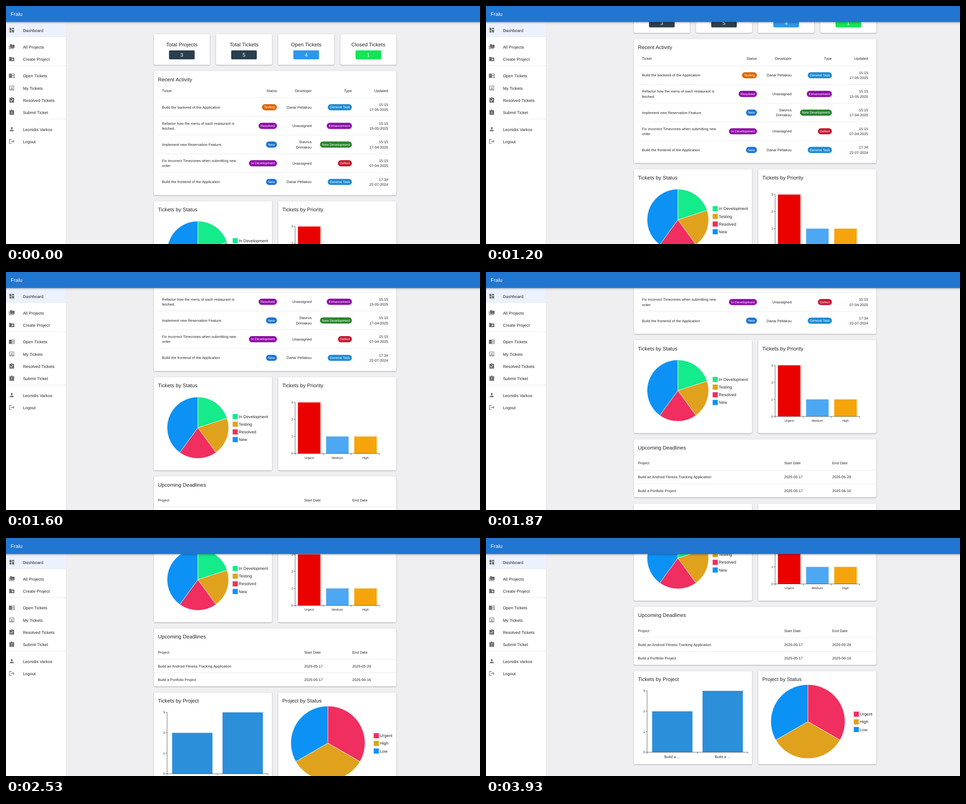
These frames come from a looping animation (1055x531 px, 4 s). An HTML page:

```html
<!DOCTYPE html>
<html lang="en">
<head>
<meta charset="utf-8">
<title>Ticket dashboard</title>
<style>
  html, body { margin: 0; width: 100%; height: 100%; overflow: hidden; background: #efeef0; }
  svg { display: block; width: 100vw; height: 100vh; }
  text {
    font-family: "Liberation Sans", Arial, sans-serif;
    letter-spacing: .15px; fill: #212121; text-rendering: geometricPrecision;
  }
  .card { fill: #fff; filter: drop-shadow(0 2px 2px rgba(0,0,0,.26)) drop-shadow(0 0 2px rgba(0,0,0,.1)); }
  .bar { fill: #2076d1; filter: drop-shadow(0 2px 4px rgba(0,0,0,.35)); }
  .rule { stroke: #e0e0e0; stroke-width: 1.2; }
  .axis { stroke: #212121; stroke-width: 1.2; fill: none; }
  .slice { stroke: #fff; stroke-width: 1.4; stroke-linejoin: round; }
  .icon { fill: #6c6c6c; fill-rule: evenodd; }
</style>
</head>
<body>
<svg viewBox="0 0 1848 930.14" preserveAspectRatio="xMinYMin slice">
  <g id="page"></g>
  <g id="side"></g>
  <g id="top"></g>
</svg>
<script>
const SCALE = 1055 / 1848;
const LOOP = 4000;
const page = document.getElementById('page');
const side = document.getElementById('side');
const topBar = document.getElementById('top');

function add(parent, tag, attrs) {
  const el = document.createElementNS('http://www.w3.org/2000/svg', tag);
  for (const key in attrs) el.setAttribute(key, attrs[key]);
  return parent.appendChild(el);
}

// y is the middle of the capitals
function label(parent, x, y, str, size = 14, anchor = 'start', fill) {
  const el = add(parent, 'text', { x, y: y + size * .355, 'font-size': size, 'text-anchor': anchor });
  if (fill) el.style.fill = fill;
  el.textContent = str;
  return el;
}

function lines(x, y, rows, anchor) {
  rows.forEach((row, i) => label(page, x, y + (i - (rows.length - 1) / 2) * 20, row, 14, anchor));
}

const box = (parent, x, y, width, height, fill, rx = 0) =>
  add(parent, 'rect', { x, y, width, height, fill, rx });

const rule = (parent, x1, x2, y) =>
  add(parent, 'line', { class: 'rule', x1, x2, y1: y, y2: y });

function card(x, y, width, height, title, titleY) {
  add(page, 'rect', { class: 'card', x, y, width, height, rx: 4 });
  if (title) label(page, x + 16, titleY, title, 20);
}

function chip(right, y, str, fill) {
  const rect = box(page, 0, y - 12, 0, 24, fill, 12);
  const text = label(page, right - 8, y, str, 13, 'end', '#fff');
  const width = text.getComputedTextLength() + 16;
  rect.setAttribute('x', right - width);
  rect.setAttribute('width', width);
}

function pie(cx, cy, r, parts) {
  const total = parts.reduce((sum, p) => sum + p[1], 0);
  const point = a => `${cx + r * Math.sin(a)} ${cy - r * Math.cos(a)}`;
  let angle = 0;
  for (const [, share, fill] of parts) {
    const end = angle + share / total * 2 * Math.PI;
    add(page, 'path', { class: 'slice', fill, d: `M${cx} ${cy}L${point(angle)}A${r} ${r} 0 0 1 ${point(end)}Z` });
    angle = end;
  }
}

function legend(x, y, parts) {
  parts.forEach(([name, , fill], i) => {
    box(page, x, y + i * 30 - 10, 20, 20, fill);
    label(page, x + 23.8, y + i * 30, name, 16);
  });
}

function barChart(x0, x1, y0, unit, labelSize, bars) {
  const band = (x1 - x0) / bars.length;
  bars.forEach(([name, value, fill], i) => {
    const x = x0 + i * band;
    box(page, x + band * .1, y0 - value * unit, band * .8, value * unit, fill);
    label(page, x + band / 2, y0 + 10 + labelSize / 2, name, labelSize, 'middle');
  });
  let d = `M${x0} ${y0 - 3 * unit}V${y0}H${x1}`;
  for (let i = 0; i <= bars.length; i++) d += `M${x0 + i * band} ${y0}v6`;
  for (let v = 0; v <= 3; v++) {
    d += `M${x0} ${y0 - v * unit}h-6`;
    label(page, x0 - 8, y0 - v * unit, v, 12, 'end');
  }
  add(page, 'path', { class: 'axis', d });
}

// Layout of the scrolling page
const LEFT = 576.3, RIGHT = 1521.9, HALF = 460.8, COL2 = 1061.1;
const RED = '#f02e5f', GOLD = '#e0a21d', BLUE = '#0c92f5', MINT = '#14eb8a';
const PURPLE = '#900aa9', SKY = '#1e8bd3', ROYAL = '#1c75d1', SLATE = '#2a3f4d';

[['Total Projects', 3, SLATE], ['Total Tickets', 5, SLATE],
 ['Open Tickets', 4, '#2d97ed'], ['Closed Tickets', 1, '#12e655']].forEach(([name, count, fill], i) => {
  const x = LEFT + i * 242.4, mid = x + 109.2;
  card(x, 110.4, 218.4, 119.6);
  label(page, mid, 150, name, 20, 'middle');
  box(page, mid - 50, 173.4, 100, 35, fill, 4);
  label(page, mid, 191, count, 20, 'middle', '#fff');
});

card(LEFT, 254, RIGHT - LEFT, 485, 'Recent Activity', 286.5);
const COLS = { ticket: 608.3, status: 1056.3, dev: 1191.5, type: 1348.5, updated: 1490 };
label(page, COLS.ticket, 330.8, 'Ticket');
label(page, COLS.status, 330.8, 'Status', 14, 'end');
label(page, COLS.dev, 330.8, 'Developer', 14, 'end');
label(page, COLS.type, 330.8, 'Type', 14, 'end');
label(page, COLS.updated, 330.8, 'Updated', 14, 'end');

[
  ['Build the backend of the Application', 'Testing', '#e36305', 'Danai Peltakou', 'General Task', SKY, '15:15|17-05-2025'],
  ['Refactor how the menu of each restaurant is|fetched.', 'Resolved', PURPLE, 'Unassigned', 'Enhancement', PURPLE, '15:15|15-05-2025'],
  ['Implement new Reservation Feature.', 'New', ROYAL, 'Stavros|Drimakou', 'New Development', '#2c8530', '15:15|17-04-2025'],
  ['Fix incorrect Timezones when submitting new|order', 'In Development', PURPLE, 'Unassigned', 'Defect', '#c81430', '15:15|07-04-2025'],
  ['Build the frontend of the Application', 'New', ROYAL, 'Danai Peltakou', 'General Task', SKY, '17:34|22-07-2024']
].forEach(([ticket, status, statusFill, dev, type, typeFill, updated], i) => {
  const top = 358.8 + i * 73, mid = top + 36.7;
  rule(page, LEFT + 16, RIGHT - 16, top);
  lines(COLS.ticket, mid, ticket.split('|'), 'start');
  chip(COLS.status, mid, status, statusFill);
  lines(COLS.dev, mid, dev.split('|'), 'end');
  chip(COLS.type, mid, type, typeFill);
  lines(COLS.updated, mid, updated.split('|'), 'end');
});

const statuses = [['In Development', 1, MINT], ['Testing', 1, GOLD], ['Resolved', 1, RED], ['New', 2, BLUE]];
card(LEFT, 763, HALF, 364, 'Tickets by Status', 796);
pie(748, 960.6, 120, statuses);
legend(883.7, 917, statuses);

card(COL2, 763, HALF, 364, 'Tickets by Priority', 796);
barChart(1127.2, 1456.5, 1061.5, 66.6, 12,
  [['Urgent', 3, '#eb0000'], ['Medium', 1, '#4ca8f2'], ['High', 1, '#f5a50b']]);

card(LEFT, 1151, RIGHT - LEFT, 226.5, 'Upcoming Deadlines', 1184);
[['Project', 'Start Date', 'End Date', 1244.3],
 ['Build an Android Fitness Tracking Application', '2025-05-17', '2025-05-28', 1298.6],
 ['Build a Portfolio Project', '2025-05-17', '2025-06-16', 1351.6]].forEach(([name, start, end, y], i) => {
  label(page, LEFT + 16, y, name);
  label(page, 1162.5, y, start);
  label(page, 1350, y, end);
  if (i) rule(page, LEFT, RIGHT, y - 26.9);
});

card(LEFT, 1402, HALF, 364, 'Tickets by Project', 1434);
barChart(628, 1021.2, 1719.3, 80, 14.5, [['Build a ...', 2, '#2b8fda'], ['Build a ...', 3, '#2b8fda']]);

const levels = [['Urgent', 1, RED], ['High', 1, GOLD], ['Low', 1, BLUE]];
card(COL2, 1402, HALF, 364, 'Project by Status', 1434);
pie(1255, 1599.3, 144.5, levels);
legend(1433.7, 1570.4, levels);

// Sidebar
const clipboard = 'M3 3h6a3 3 0 0 1 6 0h6v18H3zM11 4a1 1 0 1 0 2 0a1 1 0 1 0-2 0z';
const icons = {
  dash: 'M3 3h8v10H3zM3 15h8v6H3zM13 3h8v6h-8zM13 11h8v10h-8z',
  folders: 'M3 6H1v15h19v-2H3zM5 2h7l2 2h9v13H5z',
  create: 'M2 4h8l2 2h10v14H2zM14 9v3h-3v2h3v3h2v-3h3v-2h-3V9z',
  reader: 'M1 4h22v17H1zM12 6v13h9V6zM13 9.5h7V11h-7zm0 2.5h7v1.5h-7zm0 2.5h7V16h-7z',
  portrait: 'M3 3h18v18H3zM5 5v14h14V5zM9.8 10a2.2 2.2 0 1 0 4.4 0a2.2 2.2 0 1 0-4.4 0M7.5 17v-.7c0-3 9-3 9 0V17z',
  done: clipboard + 'M10 17l-4-4 1.4-1.4 2.6 2.6 6.6-6.6L18 9z',
  late: clipboard + 'M11 8h2v6h-2zm0 8h2v2h-2z',
  person: 'M8 8a4 4 0 1 0 8 0a4 4 0 1 0-8 0M4 20v-2c0-5.3 16-5.3 16 0v2z',
  exit: 'M17 7l-1.4 1.4 2.6 2.6H8v2h10.2l-2.6 2.6L17 17l5-5zM12 3H2v18h10v-2H4V5h8z'
};
const menu = [
  [['dash', 'Dashboard']],
  [['folders', 'All Projects'], ['create', 'Create Project']],
  [['reader', 'Open Tickets'], ['portrait', 'My Tickets'], ['done', 'Resolved Tickets'], ['late', 'Submit Ticket']],
  [['person', 'Leonidis Varkos'], ['exit', 'Logout']]
];
box(side, 0, 0, 234, 931, '#fff');
box(side, 234, 0, 1, 931, '#dedee0');
box(side, 0, 63, 234, 56.5, '#ecf2fd');
let rowY = 95.3;
menu.forEach((group, i) => {
  if (i) {
    rule(side, 0, 234, rowY - 16 - 24.5);
  }
  for (const [icon, name] of group) {
    add(side, 'path', { class: 'icon', d: icons[icon], transform: `translate(10.5 ${rowY - 13})` });
    label(side, 66, rowY, name, 16);
    rowY += 48;
  }
  rowY += 17;
});

// App bar
add(topBar, 'rect', { class: 'bar', x: -10, y: -10, width: 1868, height: 72.6 });
label(topBar, 18, 31, 'Fralu', 20, 'start', '#fff');

// Scroll position in stage pixels: [ms, px]
const stops = [[870, 0], [930, 2.3], [1200, 71.3], [1600, 201], [2130, 358], [2530, 455.5], [2800, 503.5]];
const speed = i => (stops[i + 1][1] - stops[i][1]) / (stops[i + 1][0] - stops[i][0]);
const slopes = stops.map((_, i) => {
  if (i === 0 || i === stops.length - 1) return 0;
  const a = speed(i - 1), b = speed(i);
  return 2 * a * b / (a + b);
});

function scrollAt(t) {
  const last = stops.length - 1;
  if (t <= stops[0][0]) return 0;
  if (t >= stops[last][0]) return stops[last][1];
  const i = stops.findIndex(s => s[0] > t) - 1;
  const [t0, p0] = stops[i], [t1, p1] = stops[i + 1];
  const h = t1 - t0, u = (t - t0) / h, v = 1 - u;
  return p0 * (1 + 2 * u) * v * v + p1 * (3 - 2 * u) * u * u
    + h * (slopes[i] * u * v * v - slopes[i + 1] * u * u * v);
}

// The picture advances 15 times a second, on a 10 ms grid
function tick(ms) {
  const step = Math.floor((Math.floor(ms / 10) * 10 + 3.4) * 15 / 1000);
  return Math.round(step * 100 / 15) * 10;
}

const begin = performance.now();
function draw() {
  const t = (performance.now() - begin) % LOOP;
  page.setAttribute('transform', `translate(0 ${-scrollAt(tick(t)) / SCALE})`);
  requestAnimationFrame(draw);
}
draw();
</script>
</body>
</html>
```
